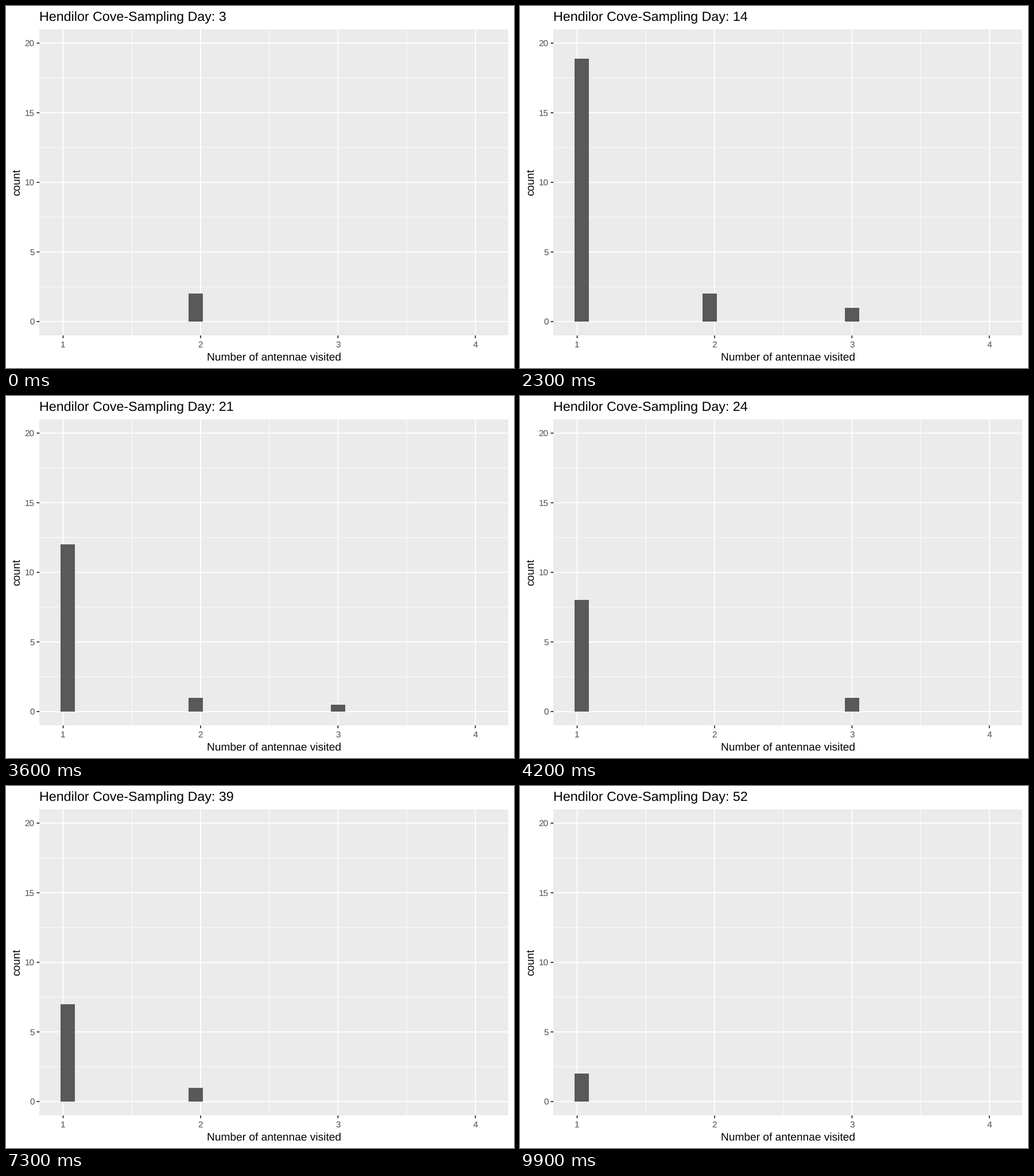
Animation, 885 px wide and 632 px high, one loop 10000 ms. Source, as a matplotlib script:

```python
import numpy as np
import matplotlib.pyplot as plt
from matplotlib.animation import FuncAnimation
from matplotlib.patches import Rectangle

W, H, DPI = 885, 632, 100
PX = 72 / DPI  # points per pixel
FRAMES, INTERVAL = 100, 100
FIRST_DAY, LAST_DAY = 3, 52
STEP = (FRAMES - 1) / (LAST_DAY - FIRST_DAY)  # frames per day

LEFT, RIGHT, TOP, BOTTOM = 58.3, 875.45, 40.5, 575.2
UNIT_Y = (BOTTOM - TOP) / 22
BIN = (RIGHT - LEFT) / 33
BIN_LEFT = LEFT + 1.5 * BIN
UNIT_X = BIN * 29 / 3

plt.rcParams["font.family"] = "Liberation Sans"
plt.rcParams["text.hinting"] = "no_hinting"
fig = plt.figure(figsize=(W / DPI, H / DPI), dpi=DPI, facecolor="white")
ax = fig.add_axes([0, 0, 1, 1])
ax.set_xlim(0, W)
ax.set_ylim(H, 0)
ax.axis("off")


def x_pos(value):
    return BIN_LEFT + BIN / 6 + (value - 1) * UNIT_X


def y_pos(value):
    return BOTTOM - (value + 1) * UNIT_Y


def box(x, y, w, h, color, z):
    return ax.add_patch(Rectangle((x, y), w, h, fc=color, lw=0, zorder=z, snap=True))


def line(xs, ys, width, color="white"):
    ax.plot(xs, ys, color=color, lw=width * PX, zorder=2,
            solid_capstyle="butt", snap=False)


def label(x, y, text, size, color="black", **kw):
    return ax.text(x, y, text, fontsize=size * PX, color=color,
                   va="baseline", zorder=5, **kw)


def bar(slot, *turns):
    """A histogram bar whose count runs straight between (day, count) turns."""
    days, counts = np.transpose(turns)
    keys = np.round((days - FIRST_DAY) * STEP)
    patch = box(BIN_LEFT + slot * BIN, y_pos(0), BIN, 0, "#595959", 3)
    return patch, keys, counts


box(LEFT, TOP, RIGHT - LEFT, BOTTOM - TOP, "#EBEBEB", 1)

for v in np.arange(2.5, 20, 5):
    line([LEFT, RIGHT], [y_pos(v)] * 2, 0.93)
for v in (1.5, 2.5, 3.5):
    line([x_pos(v)] * 2, [TOP, BOTTOM], 0.93)

for v in range(0, 21, 5):
    y = y_pos(v)
    line([LEFT, RIGHT], [y, y], 1.86)
    line([LEFT - 4.8, LEFT], [y, y], 1.86, "#333333")
    label(49.6, y + 5.4, str(v), 15.3, "#4D4D4D", ha="right")
for v in range(1, 5):
    x = x_pos(v)
    line([x, x], [TOP, BOTTOM], 1.86)
    line([x, x], [BOTTOM, BOTTOM + 4.8], 1.86, "#333333")
    label(x, 595.6, str(v), 15.3, "#4D4D4D", ha="center")

label((LEFT + RIGHT) / 2, 618.6, "Number of antennae visited", 19.2, ha="center")
label(23.7, (TOP + BOTTOM) / 2, "count", 19.2, ha="center",
      rotation=90, rotation_mode="anchor")
title = label(LEFT, 26.5, "", 23.25, ha="left")

bars = [
    bar(0, (3, 0), (11, 11), (15, 20), (24, 8), (26, 3), (39, 7),
        (41, 4), (43, 4), (46, 1), (47, 1), (52, 2)),
    bar(9, (18, 2), (24, 0), (26, 3), (39, 1), (45, 1), (46, 0)),
    bar(19, (3, 0), (11, 2), (18, 0), (24, 1), (26, 1), (39, 0)),
    bar(29, (25, 0), (26, 1), (39, 0)),
]


def update(i):
    title.set_text(f"Hendilor Cove-Sampling Day: {round(FIRST_DAY + i / STEP)}")
    for patch, keys, counts in bars:
        patch.set_height(-np.interp(i, keys, counts) * UNIT_Y)
    return [title, *(patch for patch, _, _ in bars)]


anim = FuncAnimation(fig, update, frames=FRAMES, interval=INTERVAL,
                     repeat=True, repeat_delay=0)
plt.show()
```
